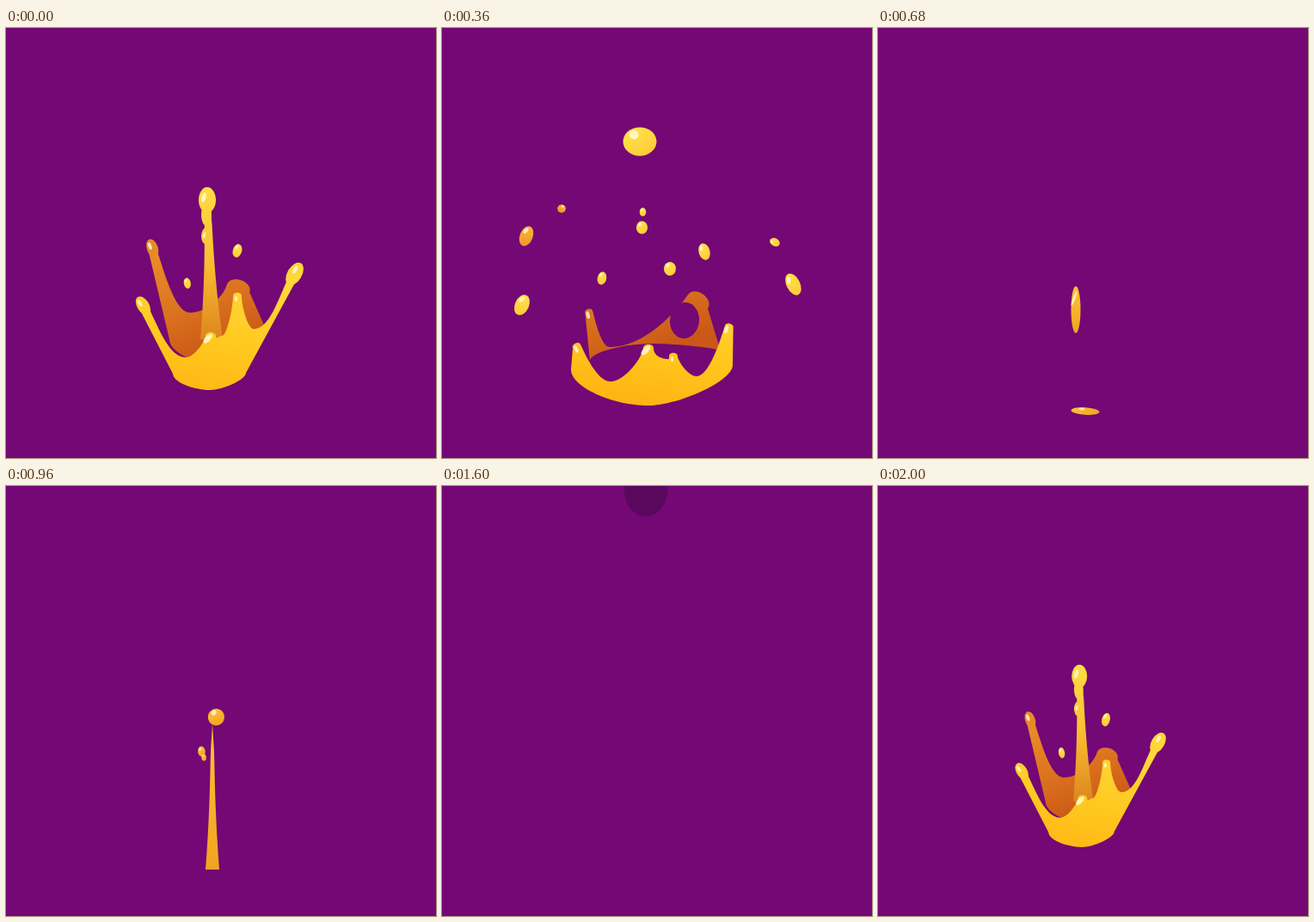
Recreate the animation shown at these times as an HTML page with a canvas. Size 500 px wide and 500 px high, loop 2040 ms.

```html
<!DOCTYPE html>
<html lang="en">
<head>
<meta charset="utf-8">
<title>Juice splash</title>
<style>
html, body { margin: 0; width: 100%; height: 100%; overflow: hidden; background: #740875; }
canvas { display: block; }
</style>
</head>
<body>
<canvas id="stage" width="500" height="500"></canvas>
<script>
const c = document.getElementById('stage').getContext('2d');
const LOOP = 2040, STEP = 40, BG = '#740875';
const OPEN = 200, LOW = 360, GONE = 600;   // crown: high at 0, wide open, low, sunk
const GRAVITY = .0008, PULL = .00104;      // px per ms², extra pull once drops fall

const clamp = (v, lo = 0, hi = 1) => Math.min(hi, Math.max(lo, v));
const mix = (a, b, u) => a + (b - a) * u;

function gradient(x0, y0, x1, y1, ...stops) {
  const g = c.createLinearGradient(x0, y0, x1, y1);
  stops.forEach((s, i) => g.addColorStop(i / (stops.length - 1), s));
  return g;
}

function ellipse(x, y, rx, ry, rot, fill) {
  c.beginPath();
  c.ellipse(x, y, Math.max(0, rx), Math.max(0, ry), rot, 0, 7);
  c.fillStyle = fill;
  c.fill();
}
const shine = (x, y, rx, ry, rot) => ellipse(x, y, rx, ry, rot, 'rgba(255,250,210,.85)');

// ---- Crown walls: each point passes through three places: high, open, low.
const point = (...path) => ({ path });
const peak = (w, bulb, gloss, ...path) => ({ w, bulb, gloss, path });

const FRONT = [
  point(194,402, 163,391, 150,397),
  peak(5, 7, 2, 154,314, 161,342, 155,367),
  point(209,383, 196,385, 196,411),
  peak(6, 0, 3.2, 238,354, 236,347, 240,368),
  point(251,358, 262,362, 263,385),
  peak(5, 0, 1.5, 269,308, 268,350, 269,378),
  point(288,350, 298,371, 296,405),
  peak(5, 8.5, 2.2, 342,275, 325,314, 335,344),
  point(279,401, 329,384, 338,392),
  point(237,421, 237,431, 240,439)];
const BACK = [
  point(190,362, 175,381, 172,387),
  peak(4.5, 6.5, 2, 167,247, 169,286, 170,327),
  point(214,331, 190,358, 195,371),
  peak(14, 0, 0, 273,294, 283,285, 303,310),
  point(302,350, 322,370, 324,376),
  point(240,390, 245,366, 245,367)];

// Parabola in time through the three places.
function follow([x0, y0, x1, y1, x2, y2], t) {
  t = clamp(t, 0, LOW);
  const a = (t - OPEN) * (t - LOW) / (OPEN * LOW);
  const b = t * (t - LOW) / (OPEN * (OPEN - LOW));
  const d = t * (t - OPEN) / (LOW * (LOW - OPEN));
  return [a * x0 + b * x1 + d * x2, a * y0 + b * y1 + d * y2];
}

// Corner, peak, valley, peak ... corner, bottom; fingers lean away from their root.
function wall(nodes, t, fill) {
  const pts = nodes.map(n => follow(n.path, t));
  const [bx, by] = pts.pop(), end = pts.length - 1, tips = [];
  c.beginPath();
  c.moveTo(...pts[0]);
  for (let i = 1; i < end; i += 2) {
    const [ax, ay] = pts[i - 1], [px, py] = pts[i], [zx, zy] = pts[i + 1];
    const first = i === 1, final = i === end - 1, w = nodes[i].w;
    const rx = first || final ? (ax + zx) / 2 - px : 0, ry = (ay + zy) / 2 - py;
    const size = Math.hypot(rx, ry), dx = rx / size, dy = ry / size, len = size * .3;
    const sx = px + dx * w * .7, sy = py + dy * w * .7;
    const lx = sx - dy * w, ly = sy + dx * w, qx = sx + dy * w, qy = sy - dx * w;
    if (first) c.lineTo(lx, ly);
    else c.bezierCurveTo(mix(ax, lx, .45), ay, lx + dx * len, ly + dy * len, lx, ly);
    c.bezierCurveTo(lx - dx * w, ly - dy * w, qx - dx * w, qy - dy * w, qx, qy);
    if (final) c.lineTo(zx, zy);
    else c.bezierCurveTo(qx + dx * len, qy + dy * len, mix(zx, qx, .45), zy, zx, zy);
    tips.push({ px, py, dx, dy, ...nodes[i] });
  }
  const [ex, ey] = pts[end], [fx, fy] = pts[0];
  c.bezierCurveTo(ex, mix(ey, by, .4), mix(bx, ex, .35), by, bx, by);
  c.bezierCurveTo(mix(bx, fx, .45), by, fx, mix(fy, by, .5), fx, fy);
  c.fillStyle = fill;
  c.fill();
  for (const { px, py, dx, dy, bulb, gloss } of tips) {
    const r = bulb * clamp(1 - t / OPEN), rot = Math.atan2(dy, dx) - Math.PI / 2;
    ellipse(px + dx * r * 1.5, py + dy * r * 1.5, r, r * 1.7, rot, fill);
    shine(px + dx * 7 - gloss, py + dy * 7, gloss, gloss * 2.2, gloss > 3 ? .75 : rot);
  }
}

// Central jet: thin at the tip, flaring to its foot.
function stem(x, tip, foot, thin, flare, fill) {
  const N = 12;
  c.beginPath();
  for (let i = -N; i <= N; i++) {
    const u = 1 - Math.abs(i) / N, v = 1 - u;
    const w = (thin + flare * v ** 2.2) * Math.min(1, v * 5);
    c.lineTo(x + 5 * v * (foot < 400) + (i < 0 ? -w : w), mix(foot, tip, u));
  }
  c.fillStyle = fill;
  c.fill();
}

// Lower half mirrored so the outline runs foot - tip - foot.
function column(t) {
  const tip = t < OPEN ? mix(186, 318, Math.max(0, t) / OPEN) : mix(318, 376, (t - OPEN) / 160);
  if (tip > 356) return;
  const fill = gradient(0, tip, 0, 362, t < 100 ? '#ffdc42' : '#f0a62a', '#f9bd32', '#dd851f');
  stem(234, tip, 362, 4, 9, fill);
  const k = clamp(1 - t / 100);
  ellipse(234, tip + 14, 10 * k, 15 * k, 0, fill);
  ellipse(233, tip + 31, 6 * k, 13 * k, 0, fill);
  ellipse(233, tip + 56, 6 * k, 10 * k, 0, fill);
  shine(230, tip + 11, 2.6 * k, 6 * k, .25);
  shine(230.5, tip + 55, 1.6 * k, 3.5 * k, .2);
}

function crown(t) {
  if (t <= -160 || t >= GONE) return;
  const grow = 1 - clamp(-t / 160) ** 1.65, sink = clamp((t - LOW) / (GONE - LOW));
  const [x, y] = sink ? [241, 446] : [236, 410];
  c.save();
  c.translate(x, y);
  c.scale(grow * (1 - .6 * sink), grow * (1 - sink * sink));
  c.translate(-x, -y);
  wall(BACK, t, gradient(205, 260, 245, 375, '#e88a28', '#dc741f', '#cb5817'));
  const torn = clamp((t - 60) / 140), u = clamp((t - OPEN) / 160);
  ellipse(mix(266, 282, u), mix(321, 340, u), torn * mix(10.5, 17, u), torn * mix(16.5, 21, u), mix(.35, .1, u), BG);
  column(t);
  wall(FRONT, t, gradient(250, 290, 222, 435, '#ffd739', '#ffc91f', '#ffb414'));
  c.restore();
}

// ---- Drops: ballistic flight, given by place and velocity at one moment.
const YELLOW = ['#ffe24c', '#ffcb38'], AMBER = ['#fdb43a', '#ee9727'], GOLD = ['#ffc238', '#f0a322'];
const drops = [];
function drop(r, x, y, vx, vy, rest) {
  const d = { r, x, y, vx, vy, tone: YELLOW, when: OPEN, born: 60, dies: 640, ...rest };
  drops.push(d);
  return d;
}

drop(18, 230, 149, 0, -.234, { born: 40, dies: 782 });
drop(4.3, 233.5, 199, 0, -.034, { born: 120 });
drop(7, 232.5, 229, 0, -.109, { born: 80 });
drop(8, 289, 234, .1, .035, { born: -80 });
drop(6.3, 197, 268, -.069, .016, { born: -80 });
drop(7.5, 264, 275, .006, -.097);
drop(10, 116, 300, -.144, .01);
const links = [
  [drop(9.5, 119, 215, -.131, .041, { tone: AMBER }), drop(4.8, 156, 230, -.106, -.253, { tone: AMBER })],
  [drop(10.3, 379, 267, .184, .066), drop(5.3, 351, 258, .225, -.184)]];

const second = { when: 1240, born: 960, dies: 1440 };
drop(13.5, 250, 304, .02, .35, second);
drop(7, 219, 302, -.03, .2, second);
drop(4.6, 224.5, 309, -.02, .2, second);

function flight(d, t) {
  const s = t - d.when, fall = Math.max(0, s - 160);
  return {
    x: d.x + d.vx * s,
    y: d.y + d.vy * s + GRAVITY * s * s + PULL * fall * fall,
    vy: d.vy + 2 * GRAVITY * s + 2 * PULL * fall
  };
}

// Drops stretch along their path, swell after birth and thin out before they die.
function drawDrop(d, t) {
  if (t < d.born || t >= d.dies) return;
  const { x, y, vy } = flight(d, t);
  if (y > 442) return;
  const stretch = .9 + 1.1 * Math.hypot(d.vx, vy);
  const r = d.r * clamp(.8 + (t - d.when + 200) / 1000) * Math.sqrt(clamp((d.dies - t) / 220));
  const rx = r / stretch, ry = r * stretch;
  c.save();
  c.translate(x, y);
  c.rotate(Math.atan(-d.vx / (Math.abs(vy) + .05) * Math.sign(vy)));
  ellipse(0, 0, rx, ry, 0, gradient(-rx / 2, -ry, rx / 2, ry, ...(t > 560 ? GOLD : d.tone)));
  shine(-rx * .35, -ry * .48, rx * .28, ry * .32, .35);
  c.restore();
}

// Sagging thread between two drops that part.
function thread([a, b], t) {
  const w = 6.5 * (1 - Math.abs(t - 190) / 110);
  if (w <= 0) return;
  const p = flight(a, t), q = flight(b, t);
  c.beginPath();
  c.moveTo(p.x, p.y);
  c.quadraticCurveTo(mix(p.x, q.x, .35), (p.y + q.y) / 2 + 21, q.x, q.y);
  c.strokeStyle = a.tone[1];
  c.lineWidth = w;
  c.lineCap = 'round';
  c.stroke();
}

function puddle(t) {
  if (t < GONE - STEP || t >= 800) return;
  const k = Math.sqrt(clamp((800 - t) / 120));
  ellipse(241, 445.5, 16.5 * k, 4.3 * k, .06, gradient(224, 440, 257, 450, ...GOLD));
  shine(237, 443, 3.5 * k, 1.3 * k, .1);
}

function rebound(t) {
  const u = (t - 800) / 320;
  if (u <= 0 || u >= 1) return;
  const tip = 446 - 170 * Math.sin(Math.PI * u);
  stem(240, tip, 446, 4 * (1 - u), 12 * (1 - u), gradient(0, tip, 0, 446, ...GOLD));
}

function shadowDrop(t) {
  const s = t - 1600;
  if (s >= 0 && s < 280) ellipse(237, 5 + .7 * s + .00188 * s * s, 25, 30.5, 0, '#5a085d');
}

function draw(now) {
  const clock = Math.floor(now % LOOP / STEP) * STEP;
  const t = clock >= 1880 ? clock - LOOP : clock;
  c.fillStyle = BG;
  c.fillRect(0, 0, 500, 500);
  shadowDrop(t);
  crown(t);
  puddle(t);
  rebound(t);
  links.forEach(l => thread(l, t));
  drops.forEach(d => drawDrop(d, t));
}

const start = performance.now();
function tick() {
  draw(performance.now() - start);
  requestAnimationFrame(tick);
}
tick();
</script>
</body>
</html>
```
